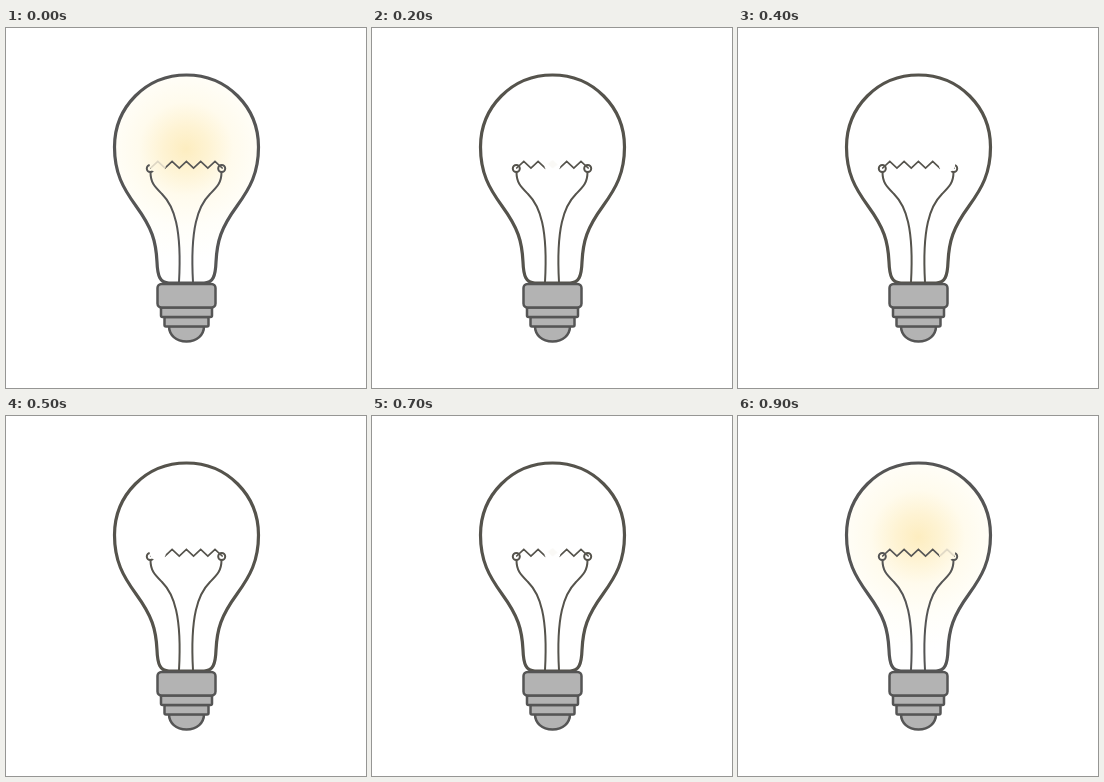
Write an HTML page without scripts that moves like this. It is 360 px wide and 360 px high and loops after 1000 ms.

```html
<!DOCTYPE html>
<html lang="en">
<head>
<meta charset="utf-8">
<title>Light bulb</title>
<style>
  html, body { margin: 0; width: 100%; height: 100%; overflow: hidden; background: #fff; }
  svg { display: block; width: 100vw; height: 100vh; }

  .line { fill: none; stroke: #55534c; stroke-linecap: round; stroke-linejoin: round; animation: warm 1s step-end infinite; }
  .glass { stroke-width: 3.2; }
  .wire { stroke-width: 2; }
  .coil { stroke-width: 1.7; stroke-linejoin: miter; }
  .base { fill: #b3b3b3; stroke: #555; stroke-width: 2.5; stroke-linejoin: round; }

  .glow { animation: glow 1s step-end infinite; }
  .run { animation: run .5s steps(5, end) infinite; }
  .hot { fill: none; stroke: #ddd6c4; stroke-width: 1.7; animation: glow 1s step-end infinite; }
  .puff { animation: puff 1s step-end infinite; }

  /* the gap visits the five peaks of the coil, twice per loop */
  @keyframes run { to { transform: translateX(71.5px); } }
  @keyframes glow { 0%, 90% { opacity: 1; } 10% { opacity: 0; } }
  @keyframes warm { 0%, 90% { stroke: #555; } 10% { stroke: #55534c; } }
  @keyframes puff {
    0%, 40%, 90% { opacity: 0; fill: #fff; }
    10% { opacity: 1; fill: #dedede; }
    20%, 30%, 70% { opacity: .3; fill: #eeece2; }
    80% { opacity: 1; fill: #dcd7c4; }
  }
</style>
</head>
<body>
<svg viewBox="0 0 360 360">
  <defs>
    <radialGradient id="light" gradientUnits="userSpaceOnUse" cx="180" cy="121" r="112">
      <stop offset="0" stop-color="#fdedc0"/>
      <stop offset=".2" stop-color="#fef3d3"/>
      <stop offset=".42" stop-color="#fffbed"/>
      <stop offset=".7" stop-color="#fffef9"/>
      <stop offset="1" stop-color="#fff"/>
    </radialGradient>
    <mask id="gap" maskUnits="userSpaceOnUse" x="0" y="0" width="360" height="360">
      <rect width="360" height="360" fill="#fff"/>
      <circle class="run" cx="151.8" cy="136.5" r="8.2" fill="#000"/>
    </mask>
    <path id="bulb" d="M180.5 47C140 47 108.5 79 108.5 119C108.5 145 117 160 130 178C146 200 150 213 151 234C151.5 248 154 255 163 255H198C207 255 209.500 248 210 234C211 213 215 200 231 178C244 160 252.500 145 252.500 119C252.500 79 221 47 180.500 47Z"/>
  </defs>

  <use class="glow" href="#bulb" fill="url(#light)"/>

  <g mask="url(#gap)">
    <g class="line wire">
      <circle cx="144.300" cy="140.500" r="3.500"/>
      <circle cx="215.700" cy="140.500" r="3.500"/>
      <path d="M144.500 144C144.500 155 149 159 156 166C168 178 176 200 173 254"/>
      <path d="M215.500 144C215.500 155 211 159 204 166C192 178 184 200 187 254"/>
    </g>
    <path class="line coil" d="M144.700 140L151.800 133.300l7.150 6.700l7.150-6.700l7.150 6.700l7.150-6.700l7.150 6.700l7.150-6.700l7.150 6.700l7.150-6.700l7.150 6.700"/>
  </g>

  <g class="run">
    <path class="hot" d="M144.700 140l7.100-6.700l7.150 6.700"/>
    <path class="puff" d="M147 136l5-4l5 4.500l-5 4z"/>
  </g>

  <use class="line glass" href="#bulb"/>

  <g class="base">
    <path d="M163 298H198C198 307 191 313.500 180.500 313.500S163 307 163 298Z"/>
    <rect x="158.500" y="289" width="44" height="9.500" rx="1.500"/>
    <rect x="155" y="279.500" width="51" height="9.500" rx="1.500"/>
    <rect x="151.500" y="256" width="58" height="23.500" rx="4"/>
  </g>
</svg>
</body>
</html>
```
